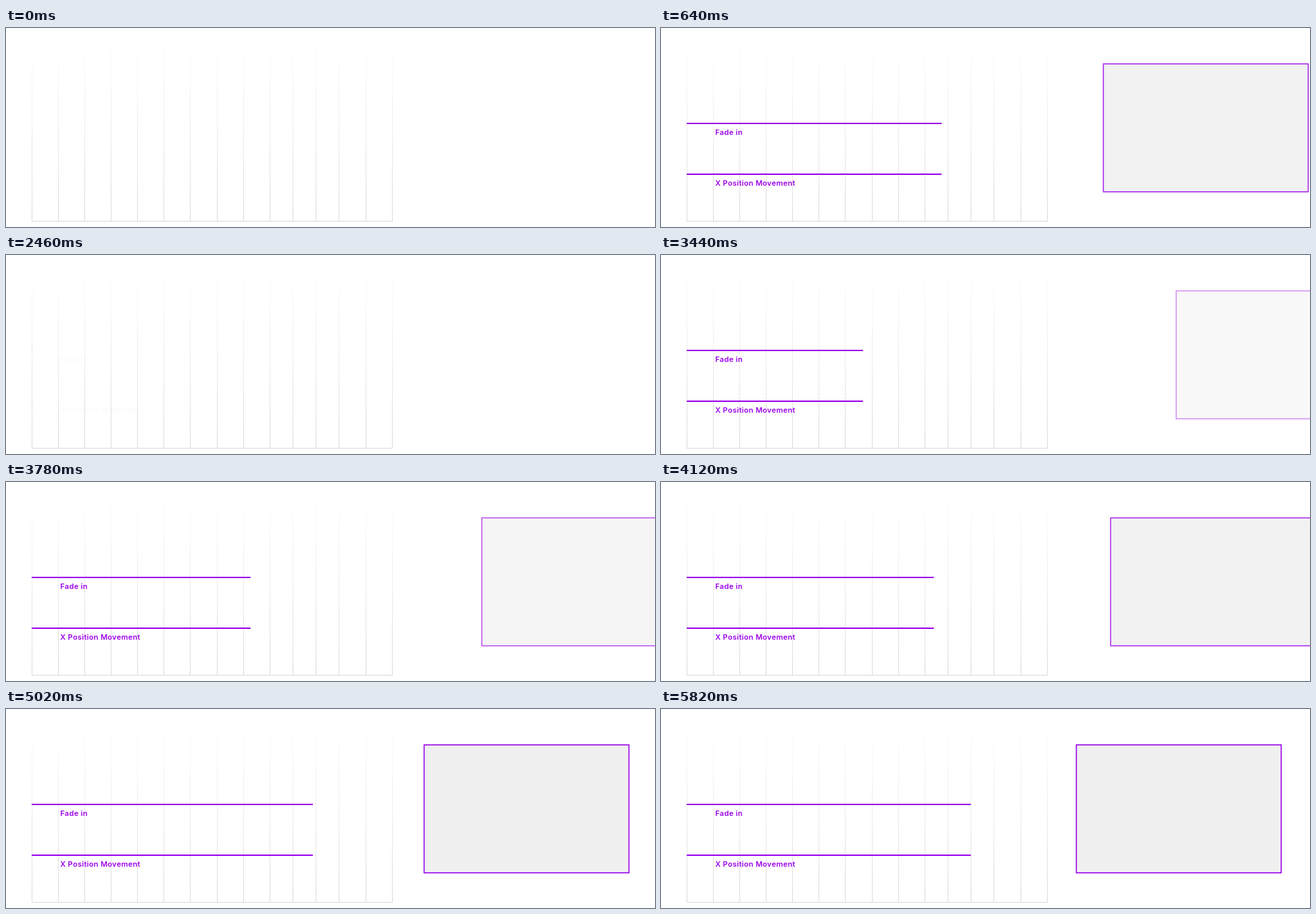
An HTML page that plays this animation: 960 by 294 pixels, repeating every 5.84 s.

```html
<!DOCTYPE html>
<html lang="en">
<head>
<meta charset="utf-8">
<title>Easing timeline</title>
<style>
  html, body { margin: 0; width: 100%; height: 100%; overflow: hidden; background: #fff; }
  svg { display: block; }
  text { font: 600 11px Inter, "Open Sans", sans-serif; letter-spacing: .3px; fill: #9b00ea; }
</style>
</head>
<body>
<svg width="960" height="294" viewBox="0 0 960 294">
  <defs>
    <linearGradient id="fade" gradientUnits="userSpaceOnUse" x1="0" y1="14" x2="0" y2="286">
      <stop offset="0" stop-color="#dadada" stop-opacity="0"/>
      <stop offset="1" stop-color="#dadada"/>
    </linearGradient>
  </defs>
  <path id="grid" stroke="url(#fade)"/>
  <path d="M38 285.5H572" stroke="#dadada"/>
  <path id="tracks" stroke="#9b00ea" stroke-width="1.8"/>
  <g id="labels">
    <text x="80.3" y="157.5">Fade in</text>
    <text x="80.3" y="232.5">X Position Movement</text>
  </g>
  <rect id="card" y="53" width="303" height="189" fill="#f0f0f0" stroke="#9b00ea" stroke-width="1.6"/>
</svg>
<script>
const LOOP = 5840;
const runs = [
  { start: 400, length: 400, end: 2020 },
  { start: 2440, length: 3000, end: LOOP }
];
const [grid, tracks, labels, card] =
  ['grid', 'tracks', 'labels', 'card'].map(id => document.getElementById(id));

const columns = [...Array(10)].map((_, i) => Math.floor(38 + 39.15 * i) + .5)
  .concat(424.5, 458.5, 492.5, 532.5, 571.5);
grid.setAttribute('d', columns.map(x => `M${x} 14V286`).join(''));

const clamp = v => Math.min(1, Math.max(0, v));
const smooth = v => v * v * (3 - 2 * v);

// cubic-bezier(.2, 0, .18, 1)
function ease(u) {
  if (u <= 0 || u >= 1) return clamp(u);
  let low = 0, high = 1;
  for (let i = 0; i < 24; i++) {
    const s = (low + high) / 2, r = 1 - s;
    const x = 3 * r * r * s * .2 + 3 * r * s * s * .18 + s ** 3;
    if (x < u) low = s; else high = s;
  }
  return smooth(low);
}

function draw(now) {
  const t = now % LOOP;
  const run = runs.find(r => t > r.start && t < r.end);
  const p = run ? ease((t - run.start) / run.length) : 0;
  const right = 38 + 420.3 * p;
  tracks.setAttribute('d', run ? `M38 141H${right}M38 216H${right}` : '');
  labels.setAttribute('opacity', run ? smooth(clamp((t - run.start) / 240)) : 0);
  card.setAttribute('x', 614.4 + 389 * (1 - p));
  card.setAttribute('opacity', clamp((p - .35) / .65));
}

const begin = performance.now();
function tick() {
  draw(performance.now() - begin);
  requestAnimationFrame(tick);
}
tick();
</script>
</body>
</html>
```
